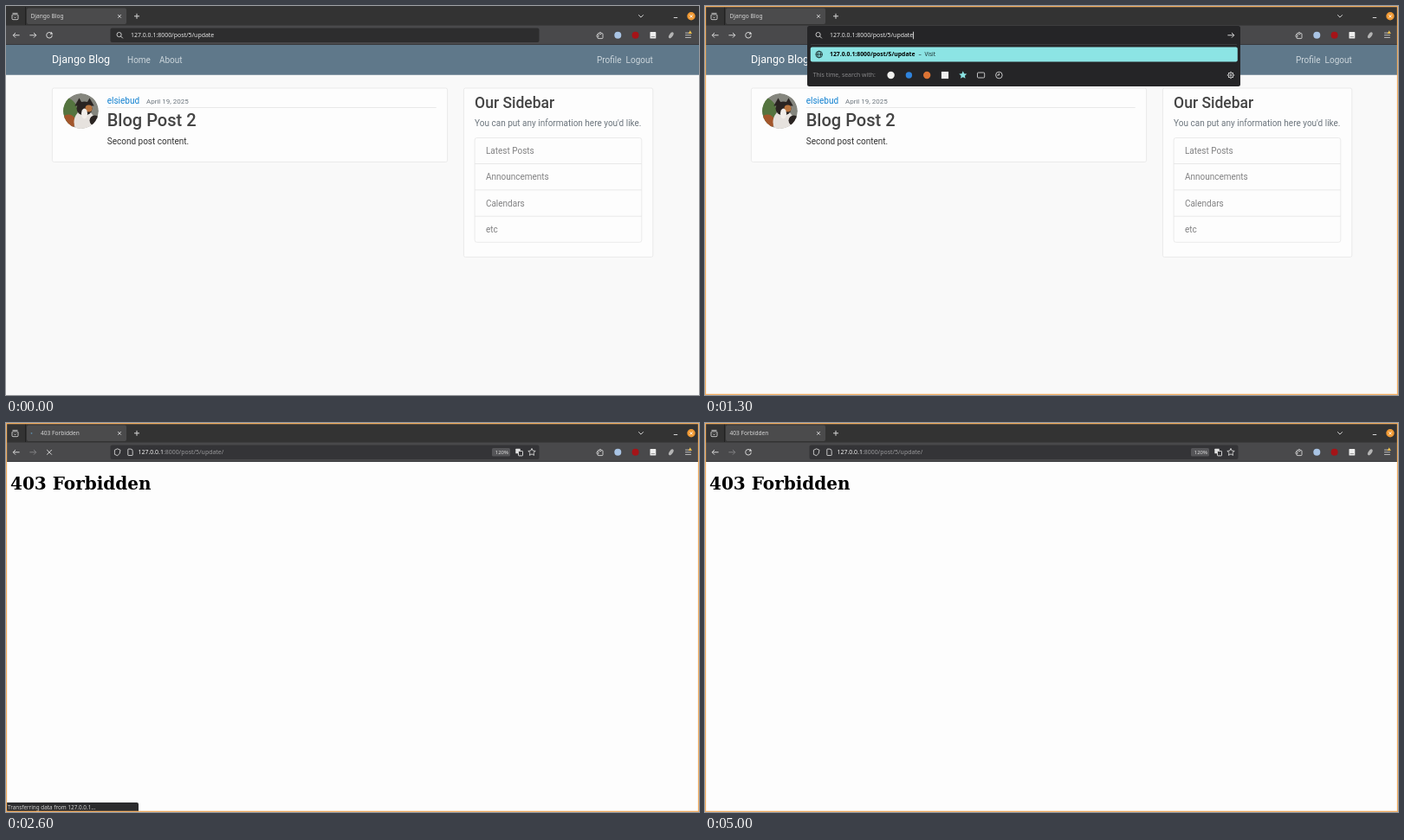
An HTML page with a canvas for the animation above (5.3 s loop, 800 px wide and 450 px high).

```html
<!DOCTYPE html>
<html lang="en">
<head>
<meta charset="utf-8">
<title>Blog update demo</title>
<style>
html, body { margin: 0; width: 100%; height: 100%; overflow: hidden; background: #f9f9f9; }
canvas { display: block; width: 800px; height: 450px; }
</style>
</head>
<body>
<canvas id="stage"></canvas>
<script>
const W = 800, H = 450, LOOP = 5300;
const T = { blur: 100, border: 700, focus: 800, wake: 950, open: 1300, close: 2200, page: 2500, done: 2800 };
const UI = '"Noto Sans", sans-serif';
const WEB = 'Roboto, sans-serif';
const HOST = '127.0.0.1', PATH = ':8000/post/5/update';

const REM = 10;                 // root text size of the page
const TAB_Y = 11.8, BAR_Y = 33.8, TOP = 45, NAV_H = 3.5 * REM;
const FIELD = { x: 120.5, y: 25.5, w: 495, h: 16.5 };
const INK = '#d6d6d6', FAINT = '#808082', EDGE = '#e2e2e2', CARD = '#fdfdfd';

const canvas = document.getElementById('stage');
const ctx = canvas.getContext('2d');
const dpr = window.devicePixelRatio || 1;
canvas.width = W * dpr;
canvas.height = H * dpr;

const ramp = (t, from, len) => Math.min(1, Math.max(0, (t - from) / len));

function paint(fill, stroke, lw = 0.9) {
  if (fill) { ctx.fillStyle = fill; ctx.fill(); }
  if (stroke) { ctx.strokeStyle = stroke; ctx.lineWidth = lw; ctx.stroke(); }
}

function box(x, y, w, h, r, fill, stroke, lw = 0.7) {
  ctx.beginPath();
  ctx.roundRect(x, y, w, h, r);
  paint(fill, stroke, lw);
}

// Box given by its centre
const plate = (x, y, w, h, r, fill, stroke) => box(x - w / 2, y - h / 2, w, h, r, fill, stroke, 0.9);

function oval(x, y, rx, ry, fill, stroke, turn = 0) {
  ctx.beginPath();
  ctx.ellipse(x, y, rx, ry, turn, 0, 2 * Math.PI);
  paint(fill, stroke);
}

const disc = (x, y, r, fill, stroke) => oval(x, y, r, r, fill, stroke);

// Polygon whose corners alternate between radius r and r * inner
function ngon(x, y, r, n, inner, fill, stroke) {
  ctx.beginPath();
  for (let i = 0; i < 2 * n; i++) {
    const a = i * Math.PI / n - Math.PI / 2, d = i % 2 ? r * inner : r;
    ctx.lineTo(x + d * Math.cos(a), y + d * Math.sin(a));
  }
  ctx.closePath();
  paint(fill, stroke);
}

// n strokes around a centre, each from radius r0 to r1
function rays(x, y, r0, r1, n, turn = 0, color = INK) {
  ctx.beginPath();
  for (let i = 0; i < n; i++) {
    const a = turn + i * 2 * Math.PI / n, c = Math.cos(a), s = Math.sin(a);
    ctx.moveTo(x + r0 * c, y + r0 * s);
    ctx.lineTo(x + r1 * c, y + r1 * s);
  }
  paint(null, color, 1);
}

// Angle bracket with its tip at (x, y), pointing along turn
function chevron(x, y, r, turn, color = INK) {
  ctx.beginPath();
  for (const side of [-1, 0, 1]) {
    const a = turn + side * 0.75 * Math.PI, d = side ? r : 0;
    ctx.lineTo(x + d * Math.cos(a), y + d * Math.sin(a));
  }
  paint(null, color, 1);
}

// Text placed by the middle of its capitals
function text(s, x, y, size, color, family = WEB, weight = 400) {
  ctx.font = `${weight} ${size}px ${family}`;
  ctx.fillStyle = color;
  ctx.fillText(s, x, y + 0.355 * size);
  return x + ctx.measureText(s).width;
}

const rule = (x, y, w, color) => box(x, y - 0.4, w, 0.8, 0, color);
const cross = (x, y, r, color) => rays(x, y, 0, r, 4, Math.PI / 4, color);

function arrow(x, y, dir, color) {
  rays(x, y, 0, 3.6, 2, 0, color);
  chevron(x + 3.8 * dir, y, 4, dir > 0 ? 0 : Math.PI, color);
}

function reload(x, y) {
  ctx.beginPath();
  ctx.arc(x, y, 3.3, 0, 1.7 * Math.PI);
  paint(null, INK, 1);
  ngon(x + 2.5, y - 2, 2, 3, 0.5, INK);
}

function magnifier(x, y) {
  disc(x - 0.7, y - 0.7, 2.6, null, INK);
  rays(x, y, 1.5, 5, 1, Math.PI / 4);
}

function shield(x, y) {
  ctx.beginPath();
  ctx.moveTo(x, y - 4);
  for (const s of [1, -1]) {
    ctx.lineTo(x + s * 3.3, y - s * 2.5);
    ctx.quadraticCurveTo(x + s * 3.3, y + 2, s > 0 ? x : x - 3.3, s > 0 ? y + 4 : y - 2.5);
  }
  ctx.closePath();
  paint(null, INK);
}

function page(x, y) {
  plate(x, y, 5.4, 7.4, [0.5, 2.4, 0.5, 0.5], null, INK);
}

function puzzle(x, y) {
  plate(x, y + 0.8, 6, 6, 0.8, null, INK);
  for (const a of [0, 1]) disc(x - 3 * a, y + 0.8 - 3 * (1 - a), 1.2, '#49494b', INK);
}

function note(x, y) {
  plate(x, y, 6.8, 7.5, 0.6, '#eeeeee');
  rule(x - 2.2, y + 1.8, 4.4, '#888888');
}

function menu(x, y) {
  for (const row of [-1, 0, 1]) rule(x - 3.4, y + 2.7 * row, 6.8, INK);
  ngon(x + 2.3, y - 3, 2.5, 3, 0.5, '#f3c04b');
}

function gear(x, y) {
  disc(x, y, 3, null, INK);
  disc(x, y, 1.1, null, INK);
  rays(x, y, 3, 4.2, 8);
}

function clock(x, y) {
  disc(x, y, 3.8, null, INK);
  rays(x, y, 0, 2.2, 4 / 3, -Math.PI / 2);
}

function globe(x, y, color) {
  for (const rx of [3.8, 1.7]) oval(x, y, rx, 3.8, null, color);
  rays(x, y, 0, 3.8, 2, 0, color);
}

// Draws icons left to right at an even pitch
const row = (x, y, pitch, icons) => icons.forEach((icon, i) => icon(x + i * pitch, y));
const dot = (r, color) => (x, y) => disc(x, y, r, color);

const EXTENSIONS = [
  puzzle, dot(4, '#a9c4e4'), dot(4, '#a51418'), note,
  (x, y) => oval(x + 0.6, y, 2, 4, '#b4b4b4', null, 0.6), menu
];
const ENGINES = [
  dot(4.2, '#f1f1ef'), dot(3.7, '#2f83dc'), dot(4.2, '#dc7434'),
  (x, y) => plate(x, y, 8.2, 8.2, 0, '#eeeeee'),
  (x, y) => ngon(x, y, 4.7, 5, 0.48, '#8ce4e4'),
  (x, y) => plate(x, y, 8.2, 6, 1, null, INK), clock
];

function avatar(x, y, r) {
  ctx.save();
  ctx.beginPath();
  ctx.arc(x, y, r, 0, 2 * Math.PI);
  ctx.clip();
  disc(x, y, r, '#85867e');
  disc(x - r, y, r * 0.8, '#54743f');
  disc(x - r * 0.7, y + r * 0.6, r * 0.4, '#a2562b');
  oval(x + 4, y + 13, 12, 14, '#e6e2de');
  disc(x + 16, y + 11, 6, '#2a2422');
  for (const side of [-1, 1]) ngon(x + 4 + 6 * side, y - 9, 6, 3, 0.5, '#2a2422');
  oval(x + 4, y - 3, 9, 8, '#2a2422');
  disc(x + 9, y - 3, 4, '#b8743f');
  oval(x + 4, y + 3, 3.5, 6, '#f2eeea');
  ctx.restore();
}

function blogPage() {
  const left = 53.4, side = 528.4, top = 95, right = 746.8;
  const nav = TOP + NAV_H / 2 - 0.1, link = '#cbd5db';
  box(0, TOP, W, H - TOP, 0, '#f9f9f9');
  box(0, TOP, W, NAV_H - 0.3, 0, '#5f788a');
  text('Django Blog', left - 0.4, nav - 0.4, 1.25 * REM, '#ffffff');
  text('About', text('Home', 140, nav, REM, link) + REM, nav, REM, link);
  text('Logout', text('Profile', 682, nav, REM, link) + REM / 2, nav, REM, link);

  const body = left + 6.33 * REM;
  box(left, top, 456.2, 85.4, 2, CARD, EDGE);
  avatar(left + 33.1, top + 26.5, 20.4);
  text('elsiebud', body, top + 14.2, REM, '#1080d0');
  text('April 19, 2025', 162, top + 14.9, 0.8 * REM, '#6c757d');
  rule(body, top + 22.4, 380, EDGE);
  text('Blog Post 2', body, top + 36.9, 2 * REM, '#444444', WEB, 500);
  text('Second post content.', body, top + 61.6, REM, '#333333');

  const inner = side + 12.7, list = top + 57.5, step = 30.2;
  const items = ['Latest Posts', 'Announcements', 'Calendars', 'etc'];
  box(side, top, right - side, 195.4, 2, CARD, EDGE);
  text('Our Sidebar', inner, top + 16.6, 1.75 * REM, '#444444', WEB, 500);
  text("You can put any information here you'd like.", inner, top + 40, REM, '#6c757d');
  box(inner, list, 192.7, items.length * step, 2.5, CARD, EDGE);
  items.forEach((s, i) => {
    if (i) rule(inner, list + i * step, 192.7, EDGE);
    text(s, inner + 12.8, list + (i + 0.5) * step, REM, '#818182');
  });
}

function errorPage(loading) {
  box(0, TOP, W, H - TOP, 0, CARD);
  text('403 Forbidden', REM / 2, 70, 2 * REM, '#000000', '"DejaVu Serif", serif', 700);
  if (!loading) return;
  box(0, H - 11, 153, 11, [0, 2, 0, 0], '#2b2b2d');
  text(`Transferring data from ${HOST}…`, 2, H - 5.3, 6.35, '#d4d4d4', UI);
}

function tabStrip(t, dim, loading, title) {
  box(0, 0, W, 23, 0, '#333333');
  box(22, 1, 0.8, 21, 0, '#1f1f1f');
  box(24, 2.5, 115, 18.5, 2, '#4b4b4c');
  ctx.globalAlpha = 1 - 0.45 * dim;
  plate(10.5, TAB_Y + 1, 7, 5.8, 1, null, INK);
  rule(7.5, TAB_Y - 3.5, 6, INK);
  chevron(10.5, TAB_Y + 2, 1.8, Math.PI / 2);
  text(title, loading ? 40 : 28.5, TAB_Y, 6.6, INK, UI);
  cross(131, TAB_Y, 2.6);
  rays(151, TAB_Y, 0, 3, 4);
  chevron(733, TAB_Y + 1.3, 4, Math.PI / 2);
  rays(773, TAB_Y + 1.7, 0, 2.2, 2);
  disc(791, TAB_Y, 4.7, '#f09a35');
  cross(791, TAB_Y, 2.2, '#ffffff');
  ctx.globalAlpha = 1;
  if (loading) disc(32 + 2.5 * Math.cos((t - T.close) / 130), TAB_Y, 0.9, t < T.page ? '#b8b8b8' : '#5d8fae');
}

function toolbar(error, loading) {
  box(0, 22.5, W, TOP - 22.5, 0, '#49494b');
  rule(0, TOP - 0.5, W, '#38393c');
  row(12, BAR_Y, 19, [
    (x, y) => arrow(x, y, -1, INK),
    (x, y) => arrow(x, y, 1, error ? FAINT : INK),
    error && loading ? (x, y) => cross(x, y, 4) : reload
  ]);
  row(686, BAR_Y, 20.3, EXTENSIONS);
}

function field(fill) {
  box(FIELD.x, FIELD.y, FIELD.w, FIELD.h, 2, fill);
}

function errorAddress() {
  field('#343437');
  row(128.7, BAR_Y, 14.8, [shield, page]);
  text(PATH + '/', text(HOST, 152.5, BAR_Y, 6.95, '#f0f0f0', UI), BAR_Y, 6.95, '#98989a', UI);
  plate(571.5, BAR_Y, 21, 9.6, 1.5, '#555558');
  text('120%', 564.7, BAR_Y, 6, '#dadada', UI);
  plate(591, BAR_Y - 1.3, 5.4, 5.7, 0.6, '#e2e2e2');
  plate(594, BAR_Y + 1.4, 5, 5.4, 0.6, '#343437', '#e2e2e2');
  ngon(607, BAR_Y, 4.4, 5, 0.48, null, INK);
}

function typedAddress(focused, open) {
  if (open) suggestions();
  else field(focused ? '#262627' : '#2d2d2e');
  if (focused && !open) box(FIELD.x + 0.8, FIELD.y + 0.8, FIELD.w - 1.6, FIELD.h - 1.6, 2, null, '#3d5f59');
  magnifier(131.3, BAR_Y);
  const end = text(HOST + PATH, 144, BAR_Y, 6.95, '#e4e4e4', UI);
  if (!focused) return;
  box(end, BAR_Y - 4, 0.8, 8.4, 0, '#ffffff');
  arrow(607, BAR_Y, 1, INK);
}

function suggestions() {
  const hit = 56, foot = 80, dark = '#1c3030';
  box(118, 23, 500, 70, 2.5, '#252527');
  rule(122, 44.5, 492, '#39393b');
  plate(368.3, hit, 493, 16.8, 2, '#8ce4e4');
  globe(131.7, hit, dark);
  text(HOST + PATH, 144, hit, 6.85, '#000000', UI, 700);
  text('–', 246.5, hit, 6.6, dark, UI);
  text('Visit', 253.5, hit, 6.4, dark, UI);
  text('This time, search with:', 124.7, foot, 6.9, '#88888a', UI);
  row(214.6, foot, 20.8, ENGINES);
  gear(607, foot);
}

function draw(t) {
  const error = t >= T.page;
  const loading = t >= T.close && t < T.done;
  const open = t >= T.open && t < T.close;
  const dim = ramp(t, T.blur, 300) - ramp(t, T.wake, 250);

  ctx.setTransform(dpr, 0, 0, dpr, 0, 0);
  if (error) errorPage(loading);
  else blogPage();
  tabStrip(t, dim, loading, error ? '403 Forbidden' : 'Django Blog');
  toolbar(error, loading);
  if (error) errorAddress();
  else typedAddress(t >= T.focus, open);
  if (t >= T.border) box(0.5, 0.5, W - 1, H - 1, 0, null, '#f0ad62', 1.3);
}

function frame(now) {
  draw(now % LOOP);
  requestAnimationFrame(frame);
}
requestAnimationFrame(frame);
</script>
</body>
</html>
```
